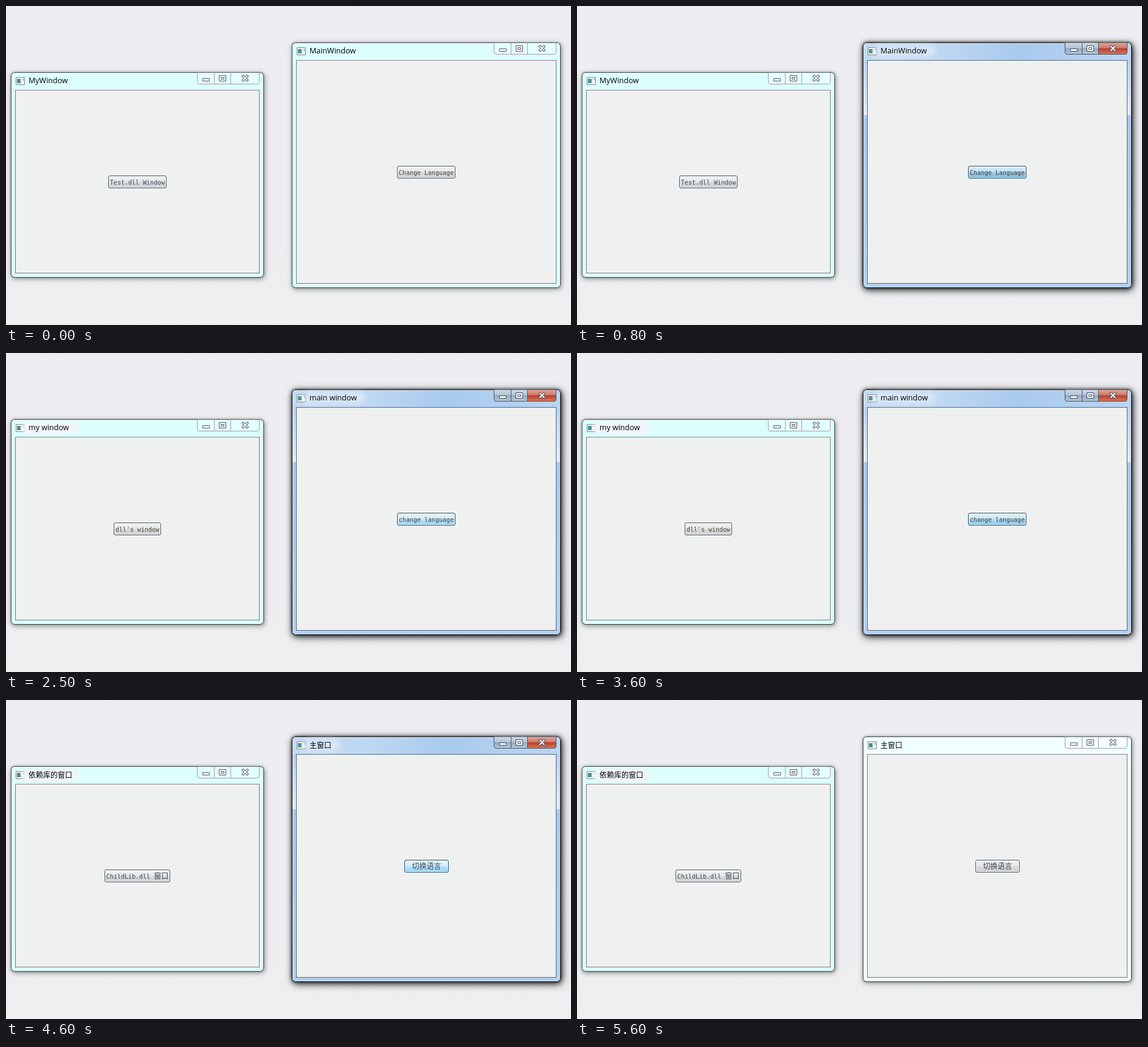
Write an HTML page that moves like this. It is 929 px wide and 525 px high and loops after 5700 ms.

```html
<!DOCTYPE html>
<html lang="en">
<head>
<meta charset="utf-8">
<title>Language switch</title>
<style>
html, body { margin: 0; width: 100%; height: 100%; overflow: hidden; }
body { background: linear-gradient(#ebecf0, #eeeef2 8px, #eeeef2 75%, #eeefef); }

:root {
  --rest: linear-gradient(#f0f2f2, #e6e8e8 48%, #d9dadb 52%, #cfd0d2);
  --cool: linear-gradient(#eef3f6, #e2eaf0 48%, #d0dae2 52%, #c6d3db);
  --hover: linear-gradient(#e6f4fc, #d3edfb 48%, #b5e1fa 52%, #9fd5f3);
  --warm: linear-gradient(#e0f1fa, #c8e8f7 48%, #a8daf4 52%, #90cbec);
  --press: linear-gradient(#dbeef8, #bfe0f1 48%, #99cce8 52%, #82bbdb);
}

.stage {
  position: absolute; left: 0; top: 0; width: 929px; height: 525px; overflow: hidden;
  --face: var(--rest); --edge: #4c5a5f; --halo: transparent; --glass: #dcfffe;
  animation: tint 5.7s step-end infinite, glass 5.7s step-end infinite;
}
.stage * { box-sizing: border-box; position: absolute; }

/* Window frames */
.win { border-radius: 6px; }
.left { left: 8px; top: 109px; width: 416px; height: 338px; }
.right { left: 470px; top: 60px; width: 442px; height: 404px; }
.frame {
  inset: 0; border-radius: inherit; background: #dcfffe;
  box-shadow: inset 0 0 0 1px #445254, inset 0 0 0 2px #e6fffe,
    0 0 3px rgba(0,0,0,.35), 1px 2px 8px rgba(0,0,0,.42);
}
.right .frame { background: var(--glass); }
.client {
  inset: 29px 7px 7px; background: #eff1f0;
  border: 1px solid #757b7c; border-top-color: #8f808b;
}
.caption {
  right: 7px; top: 0; width: 103px; height: 20px; overflow: visible;
  --face-a: rgba(240,255,255,.3); --face-b: rgba(240,255,255,.3);
  --line: #a39fa8; --mark: #55545f;
}
.icon { left: 8px; top: 8px; width: 15px; height: 13px; }
.active { inset: 0; border-radius: inherit; animation: active 5.7s step-end infinite; }
.active .frame {
  background:
    linear-gradient(90deg, #c6daf2, #bfd8f2 28%, #a9caee 58%, #bbd5f2) 0 0 / 100% 29px no-repeat,
    linear-gradient(#b8d2f0 29px, #e3edf9 119px, #a8c8ee 120px, #b5d1f1);
  box-shadow: inset 0 0 0 1px #131b22, inset 0 0 0 2px rgba(225,240,253,.6),
    0 0 5px rgba(0,0,0,.5), 2px 3px 14px rgba(0,0,0,.72);
}
.active .client { border-color: #566a7d; }
.active .caption { --face-a: url(#steel); --face-b: url(#red); --line: #47586a; --mark: #474b5e; }

/* Texts, one layer per language */
.lang { inset: 0; animation: 5.7s step-end infinite; }
.first { animation-name: first; }
.zh { animation-name: zh; }
.en { animation-name: en; }
.title {
  font: 12.5px/20px "Open Sans", "Noto Sans CJK SC", "Noto Sans CJK", sans-serif;
  white-space: pre; color: #000; z-index: 0;
}
.zh .title { font-size: 12px; padding-top: 1px; }
.title::before {
  content: ""; position: absolute; z-index: -1; inset: 0 -14px 0 -10px;
  border-radius: 10px; background: var(--halo); filter: blur(4px);
}
.t1 { left: 37px; top: 113px; }
.t2 { left: 499px; top: 64px; }
.lang .t1 { --halo: #f1f5f9; }
.lang .t1::before { right: auto; width: 94px; filter: blur(2px); }
.first .t1 { --halo: transparent; }

.btn {
  height: 21px; border: 1px solid #4c5a5f; border-radius: 3px;
  box-shadow: inset 0 0 0 1px rgba(255,255,255,.6);
  font: 10px/21px "DejaVu Sans Mono", "Liberation Mono", monospace;
  text-align: center; white-space: pre; color: #3b4554;
}
.b1 { left: 216px; top: 279px; transform: translateX(-50%); background: var(--rest); }
.b2 {
  top: 263px; left: 643px; width: 96px;
  background: var(--face); border-color: var(--edge); color: #453f40;
}
.first .b1 { width: 96px; color: #3a4d60; }
.zh .b1 { width: 108px; }
.en .b1 { left: 177px; width: 78px; transform: none; color: #5c4537; }
.zh .b2 { left: 655px; width: 73px; color: #3b4554; }
.btn i {
  position: static; font: 12px/0 "Noto Sans CJK SC", "Noto Sans CJK", sans-serif;
}

@keyframes first { 0% { opacity: 1 } 15.789%, 100% { opacity: 0 } }
@keyframes zh {
  0% { opacity: 0 } 15.789% { opacity: 1 } 43.859% { opacity: 0 }
  64.912% { opacity: 1 } 75.438% { opacity: 0 } 80.701%, 100% { opacity: 1 }
}
@keyframes en {
  0% { opacity: 0 } 43.859% { opacity: 1 } 64.912% { opacity: 0 }
  75.438% { opacity: 1 } 80.701%, 100% { opacity: 0 }
}
@keyframes active {
  0% { opacity: 0 } 12.28% { opacity: .7 } 14.035% { opacity: 1 } 98.245%, 100% { opacity: 0 }
}
@keyframes glass {
  0% { --glass: #dcfffe; --halo: transparent }
  12.28% { --glass: #dcfffe; --halo: rgba(232,241,250,.6) }
  98.245%, 100% { --glass: #f0ffff; --halo: transparent }
}
@keyframes tint {
  0% { --face: var(--rest); --edge: #4c5a5f }
  7.017% { --face: var(--hover); --edge: #2f5268 }
  12.28% { --face: var(--press); --edge: #2f5268 }
  15.789% { --face: var(--warm); --edge: #2f5268 }
  26.315% { --face: var(--hover); --edge: #2f5268 }
  42.105% { --face: var(--press); --edge: #2f5268 }
  43.859% { --face: var(--hover); --edge: #2f5268 }
  63.157% { --face: var(--warm); --edge: #2f5268 }
  64.912% { --face: var(--hover); --edge: #2f5268 }
  73.684% { --face: var(--press); --edge: #2f5268 }
  75.438% { --face: var(--hover); --edge: #2f5268 }
  92.982% { --face: var(--cool); --edge: #4c5a5f }
  98.245%, 100% { --face: var(--rest); --edge: #4c5a5f }
}
</style>
</head>
<body>
<svg width="0" height="0" style="position:absolute">
  <defs>
    <linearGradient id="steel" x2="0" y2="1">
      <stop stop-color="#cbd8e6"/><stop offset=".45" stop-color="#b3c4d6"/>
      <stop offset=".5" stop-color="#93a7bd"/><stop offset="1" stop-color="#b4c8dd"/>
    </linearGradient>
    <linearGradient id="red" x2="0" y2="1">
      <stop stop-color="#e3a699"/><stop offset=".45" stop-color="#cf7b6b"/>
      <stop offset=".5" stop-color="#b83f2c"/><stop offset="1" stop-color="#d5785f"/>
    </linearGradient>
    <symbol id="caption" viewBox="0 0 103 20">
      <path d="M.5 .5V16q0 3.500 3.500 3.500H55.500V.5z" style="fill:var(--face-a)"/>
      <path d="M55.500 .5V19.500H99q3.500 0 3.500-3.500V.5z" style="fill:var(--face-b)"/>
      <path d="M.5 .5V16q0 3.500 3.500 3.500H99q3.500 0 3.500-3.500V.5M28.500 .5v19M55.500 .5v19" fill="none" style="stroke:var(--line)"/>
      <g fill="#fff" style="stroke:var(--mark)">
        <path d="M9.500 10.500h11v4h-11zM36.500 5.500h11v9h-11z"/>
        <path d="M39.500 8.500h5v3h-5z"/>
      </g>
      <path d="M76 6.500l6.500 6.500m0-6.500l-6.500 6.500" stroke-width="4" stroke-linecap="square" style="stroke:var(--mark)"/>
      <path d="M76 6.500l6.500 6.500m0-6.500l-6.500 6.500" stroke="#fff" stroke-width="2" stroke-linecap="square"/>
    </symbol>
    <symbol id="icon" viewBox="0 0 15 13">
      <path d="M.5 .5h14v12H.5z" fill="#f6f8f8" stroke="#7d8789"/>
      <path d="M2 3h6v7H2z" fill="#4c9189"/>
      <path d="M2 3h3v3H2z" fill="#5d7fa5"/>
      <path d="M9 3h1v1H9zM12 2h1v4h-1zM9 9h1v1H9z" fill="#78898b"/>
    </symbol>
  </defs>
</svg>

<div class="stage">
  <div class="win left">
    <div class="frame"></div><div class="client"></div>
    <svg class="caption"><use href="#caption"/></svg>
    <svg class="icon"><use href="#icon"/></svg>
  </div>
  <div class="win right">
    <div class="frame"></div><div class="client"></div>
    <svg class="caption"><use href="#caption"/></svg>
    <div class="active">
      <div class="frame"></div><div class="client"></div>
      <svg class="caption"><use href="#caption"/></svg>
    </div>
    <svg class="icon"><use href="#icon"/></svg>
  </div>

  <div class="lang first">
    <div class="title t1">MyWindow</div><div class="btn b1">Test.dll Window</div>
    <div class="title t2">MainWindow</div><div class="btn b2">Change Language</div>
  </div>
  <div class="lang zh" lang="zh-CN">
    <div class="title t1">依赖库的窗口</div><div class="btn b1">ChildLib.dll <i>窗口</i></div>
    <div class="title t2">主窗口</div><div class="btn b2"><i>切换语言</i></div>
  </div>
  <div class="lang en">
    <div class="title t1">my window</div><div class="btn b1">dll's window</div>
    <div class="title t2">main window</div><div class="btn b2">change language</div>
  </div>
</div>
</body>
</html>
```
